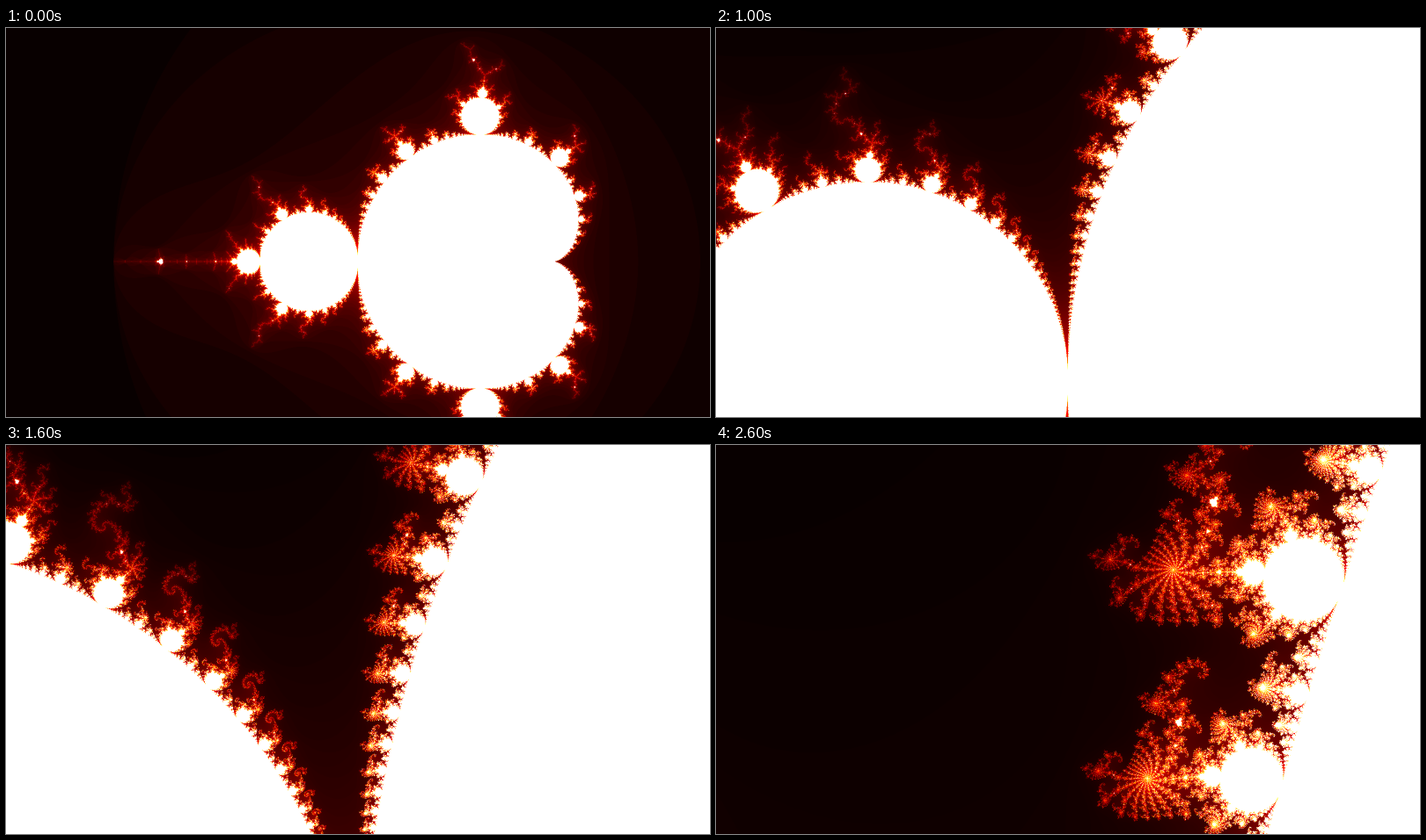
These frames come from a looping animation (800 by 443 pixels, 3 s). An HTML page with a canvas:

```html
<!DOCTYPE html>
<html lang="en">
<head>
<meta charset="utf-8">
<title>Mandelbrot zoom</title>
<style>
  html, body { margin: 0; width: 100%; height: 100%; overflow: hidden; background: #080000; }
  canvas { display: block; width: 800px; height: 443px; }
</style>
</head>
<body>
<canvas id="stage" width="800" height="443"></canvas>
<script>
const W = 800, H = 443, LOOP = 3000;
const STARTS = [0, 400, 600, 1000, 1400, 1600, 2000, 2400, 2600];
const CENTER = { re: -0.75, im: 0.2 };
const SPAN = 3.6;
const ZOOM = 1.6;
const SUB = 2; // samples per pixel along each axis

const ctx = document.getElementById('stage').getContext('2d');
const views = [];
const clamp = v => Math.max(0, Math.min(1, v));

// Black, red, yellow, white ramp
function heat(v) {
  return [
    8 + 247 * clamp(v / 0.365),
    255 * clamp((v - 0.365) / 0.381),
    255 * clamp((v - 0.746) / 0.254)
  ];
}

// The main cardioid and the period-2 disc never escape
function isInside(x, y) {
  const yy = y * y, u = x - 0.25, q = u * u + yy;
  return q * (q + u) <= yy / 4 || (x + 1) * (x + 1) + yy <= 1 / 16;
}

function escapeCount(cx, cy, limit) {
  if (isInside(cx, cy)) return limit;
  let x = 0, y = 0, xx = 0, yy = 0, n = 0;
  while (n < limit && xx + yy <= 4) {
    y = 2 * x * y + cy;
    x = xx - yy + cx;
    xx = x * x;
    yy = y * y;
    n++;
  }
  return n;
}

function countGrid(step, limit) {
  const cols = W * SUB, rows = H * SUB;
  const d = SPAN / ZOOM ** step / cols;
  const counts = new Uint16Array(cols * rows);
  let p = 0;
  for (let j = 0; j < rows; j++) {
    const cy = CENTER.im - (j + 0.5 - rows / 2) * d;
    for (let i = 0; i < cols; i++) {
      counts[p++] = escapeCount(CENTER.re + (i + 0.5 - cols / 2) * d, cy, limit);
    }
  }
  return counts;
}

function render(step) {
  const limit = 100 + 35 * step;
  const counts = countGrid(step, limit);
  const low = counts.reduce((a, b) => Math.min(a, b));
  const ramp = Array.from({ length: limit + 1 }, (_, n) => heat((n - low) / (limit - low)));
  const image = ctx.createImageData(W, H);
  const data = image.data;
  let p = 0;
  for (let j = 0; j < H; j++) {
    for (let i = 0; i < W; i++) {
      let r = 0, g = 0, b = 0;
      for (let s = 0; s < SUB; s++) {
        const row = (j * SUB + s) * W * SUB + i * SUB;
        for (let k = 0; k < SUB; k++) {
          const color = ramp[counts[row + k]];
          r += color[0];
          g += color[1];
          b += color[2];
        }
      }
      const area = SUB * SUB;
      data[p++] = r / area;
      data[p++] = g / area;
      data[p++] = b / area;
      data[p++] = 255;
    }
  }
  return image;
}

let shown = -1;

function draw(now) {
  const t = now % LOOP;
  let step = STARTS.length - 1;
  while (step > 0 && t < STARTS[step]) step--;
  if (step !== shown) {
    views[step] = views[step] || render(step);
    ctx.putImageData(views[step], 0, 0);
    shown = step;
  }
  requestAnimationFrame(draw);
}

draw(0);
</script>
</body>
</html>
```
